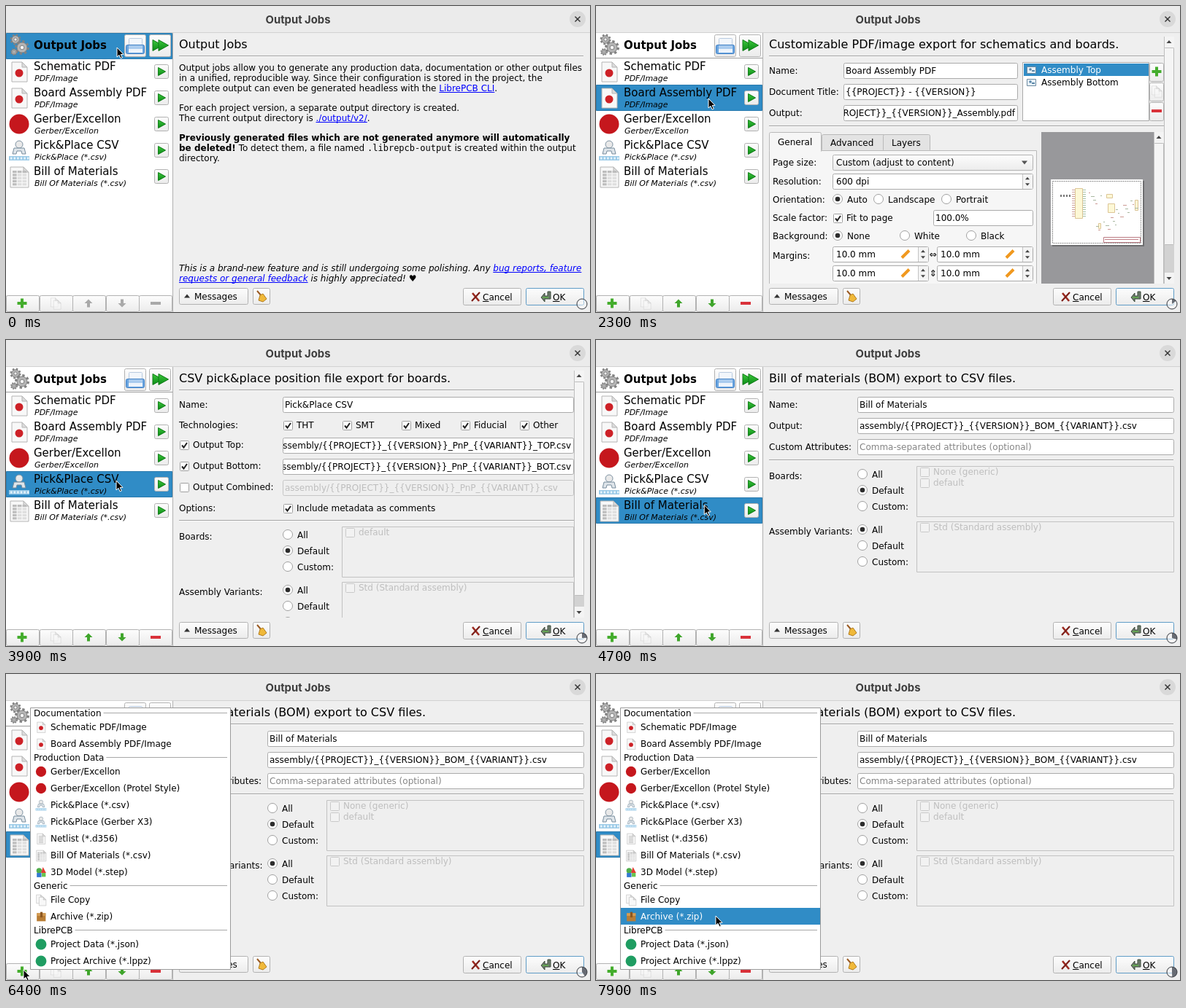
Write an HTML page with a canvas that moves like this. It is 800 by 420 pixels and loops after 8 s.

```html
<!DOCTYPE html>
<html lang="en">
<head>
<meta charset="utf-8">
<title>Output Jobs</title>
<style>
html, body { margin: 0; width: 100%; height: 100%; overflow: hidden; background: #efefef; }
canvas { display: block; width: 800px; height: 420px; }
</style>
</head>
<body>
<canvas id="stage" width="800" height="420"></canvas>
<script>
const c = document.getElementById('stage').getContext('2d');
const LOOP = 8000, STEP = 100, TOTAL = 16000, MENU_AT = 6300;
const BLUE = '#308cc6', GREY = '#bebebe', EDGE = '#ababab', GROOVE = '#d2d2d2';
const SANS = '"DejaVu Sans", sans-serif';
const font = (px, style = '') => `${style} ${px}px ${SANS}`;
const REG = font(12), BOLD = font(12, 'bold'), ITAL = font(12, 'italic');
const MONO = '12px "DejaVu Sans Mono", monospace';

// ---------- basics ----------
function txt(s, x, y, color = '#000', f = REG, align = 'left') {
  c.font = f; c.fillStyle = color; c.textAlign = align;
  c.fillText(s, x, y);
}
function fill(x, y, w, h, color) { c.fillStyle = color; c.fillRect(x, y, w, h); }
function box(x, y, x2, y2, color, edge = EDGE, r = 2) {
  c.beginPath();
  c.roundRect(x + .5, y + .5, x2 - x, y2 - y, r);
  if (color) { c.fillStyle = color; c.fill(); }
  c.strokeStyle = edge; c.lineWidth = 1; c.stroke();
}
function disc(x, y, r, color, edge) {
  c.beginPath(); c.arc(x, y, r, 0, Math.PI * 2);
  c.fillStyle = color; c.fill();
  if (edge) { c.strokeStyle = edge; c.lineWidth = 1; c.stroke(); }
}
function poly(points, color, edge, w = 1) {
  c.beginPath();
  points.forEach(([x, y], i) => i ? c.lineTo(x, y) : c.moveTo(x, y));
  c.closePath();
  if (color) { c.fillStyle = color; c.fill(); }
  if (edge) { c.strokeStyle = edge; c.lineWidth = w; c.stroke(); }
}
function line(x, y, x2, y2, color, w = 1) {
  c.beginPath(); c.moveTo(x, y); c.lineTo(x2, y2);
  c.strokeStyle = color; c.lineWidth = w; c.stroke();
}
function clip(x, y, w, h, draw) {
  c.save(); c.beginPath(); c.rect(x, y, w, h); c.clip(); draw(); c.restore();
}
function at(x, y, k, draw, alpha = 1) {
  c.save(); c.translate(x, y); c.scale(k, k); c.globalAlpha = alpha; draw(); c.restore();
}
// runs: [text, 'b' bold | 'i' italic | 'm' mono, link?]
function rich(x, y, ...runs) {
  for (const [s, kind, link] of runs) {
    txt(s, x, y, link ? '#0000ff' : '#000', { b: BOLD, i: ITAL, m: MONO }[kind] || REG);
    const w = c.measureText(s).width;
    if (link) fill(x, y + 1, w, 1, '#0000ff');
    x += w;
  }
}

// ---------- widgets ----------
function rule(y, x2 = 778) { fill(237, y, x2 - 237, 1, '#a4a4a4'); fill(237, y + 1, x2 - 237, 1, '#fbfbfb'); }
function head(s, x2) { txt(s, 237, 58, '#000', font(16)); if (x2) rule(68, x2); }
function button(x, y, x2, y2, edge = '#b2b2b2') {
  const g = c.createLinearGradient(0, y, 0, y2);
  g.addColorStop(0, '#fdfdfd'); g.addColorStop(1, '#ececec');
  box(x, y, x2, y2, g, edge);
}
function field(x, y, x2, s, { right, off, color } = {}) {
  box(x, y, x2, y + 21, off ? '#efefef' : '#fff', off ? '#c6c6c6' : EDGE);
  clip(x + 1, y, x2 - x - 1, 22, () =>
    txt(s, right ? x2 - 3 : x + 3, y + 15, off ? GREY : color, REG, right ? 'right' : 'left'));
}
function check(x, y, on, s, off) {
  box(x, y, x + 12, y + 12, off ? '#f2f2f2' : '#fff', off ? '#c9c9c9' : '#a0a0a0', 1);
  if (on) {
    c.beginPath(); c.moveTo(x + 3, y + 6.5); c.lineTo(x + 5.5, y + 9.5); c.lineTo(x + 10, y + 3);
    c.strokeStyle = '#222'; c.lineWidth = 2; c.stroke();
  }
  txt(s, x + 18, y + 10, off ? GREY : '#000');
}
function radio(x, y, on, s) {
  disc(x, y, 6.5, '#fff', '#a0a0a0');
  if (on) disc(x, y, 3.3, '#2c2c2c');
  txt(s, x + 13, y + 5);
}
function tri(x, y, dir, color = '#444', s = 3.5) {
  const a = { up: -Math.PI / 2, down: Math.PI / 2, left: Math.PI, right: 0 }[dir];
  c.save(); c.translate(x, y); c.rotate(a);
  poly([[s * .6, 0], [-s * .6, -s], [-s * .6, s]], color);
  c.restore();
}
function vbar(x, y, y2, end) {
  fill(x, y, 14, y2 - y, GROOVE);
  line(x + .5, y, x + .5, y2, '#c2c2c2');
  fill(x + 1, y, 13, 15, '#f4f4f4');
  fill(x + 1, y2 - 15, 13, 15, '#f4f4f4');
  box(x, y + 15, x + 13, end, '#f5f5f5', '#bdbdbd', 1);
  tri(x + 7, y + 7, 'up'); tri(x + 7, y2 - 7, 'down');
}
function spin(x, y, x2, s, ruler) {
  box(x, y, x2, y + 21, '#fff');
  fill(x2 - 14, y + 1, 14, 20, '#f4f4f4');
  line(x2 - 13.5, y + 1, x2 - 13.5, y + 21, '#c4c4c4');
  tri(x2 - 7, y + 6.5, 'up', '#444', 3); tri(x2 - 7, y + 15, 'down', '#444', 3);
  txt(s, x + 5, y + 15);
  if (ruler) line(x2 - 36, y + 15.5, x2 - 26, y + 5.5, '#f0981e', 4);
}

// ---------- icons, drawn around the origin on a 28 px cell ----------
function page(x = -10, y = -13, w = 21, h = 27) {
  poly([[x, y], [x + w - 7, y], [x + w, y + 7], [x + w, y + h], [x, y + h]], '#f8f8f8', '#b4b4b4');
  poly([[x + w - 7, y], [x + w, y + 7], [x + w - 7, y + 7]], '#dcdcdc', '#b4b4b4');
}
function gear(x, y, r) {
  c.beginPath(); c.arc(x, y, r, 0, Math.PI * 2);
  c.setLineDash([r * Math.PI / 8]); c.lineWidth = r * .5; c.strokeStyle = '#828282'; c.stroke();
  c.setLineDash([]);
  disc(x, y, r * .88, '#b5b5b5', '#808080');
  disc(x, y, r * .36, '#f4f4f4', '#808080');
}
const icon = {
  gears() { gear(-5, -8, 6); gear(4, 3, 8); gear(-7, 9, 4); },
  pdf() { page(); disc(0, 2, 5.5, '#cd2127'); },
  gbr() { disc(0, 0, 13.5, '#c5171d'); },
  pnp() {
    disc(0, -8, 5, '#e9e9e9', '#7f93a3');
    poly([[-7, -3], [7, -3], [9, 5], [4, 5], [3, 1], [-3, 1], [-4, 5], [-9, 5]], '#dfe5ea', '#768c9c');
    fill(-14, 8, 28, 6, '#9ccbe8');
    for (let i = 0; i < 6; i++) fill(-12 + i * 4.6, 9.5, 2.4, 3, '#e8f5fc');
  },
  bom() {
    page(-12, -13, 25, 28);
    for (let i = 0; i < 5; i++) for (let j = 0; j < 3; j++)
      fill(-9 + j * 6.8, -8 + i * 4.3, 5.6, 3.2, j && i ? '#dedede' : '#bdbdbd');
  },
  net() { page(); for (let i = 0; i < 5; i++) fill(-6, -7 + i * 4, 12, 2, '#bdbdbd'); },
  cube() {
    disc(-5, -4, 7, '#4fae4c'); fill(-11, 2, 12, 11, '#3278d2');
    poly([[5, -13], [13, 2], [0, 2]], '#e23d33'); fill(2, 2, 10, 10, '#67c54e');
  },
  copy() { page(-12, -13, 18, 22); page(-5, -7, 18, 22); },
  zip() { fill(-11, -9, 23, 21, '#b97d35'); fill(-11, -9, 23, 7, '#d49d55'); fill(-2, -12, 6, 14, '#8c5720'); },
  pcb() { disc(0, 0, 14, '#1f9d62'); },
  tray() {
    box(-9, -11, 9, 0, '#f2f6fb', '#b9cbe0', 1);
    box(-13, -2, 12, 10, '#6aa5e0', '#3f7fc4', 2);
    fill(-9, -1, 19, 5, '#a9cbee');
    fill(-9, 4, 19, 5, '#eef4fb');
  }
};
const put = (name, x, y, k = 1, alpha = 1) => at(x, y, k, icon[name], alpha);
function plus(x, y, s = 6.5) {
  fill(x - s, y - 2, s * 2, 4, '#44ad2d'); fill(x - 2, y - s, 4, s * 2, '#44ad2d');
}
function minus(x, y, color = '#d9323a') { fill(x - 7, y - 2, 14, 4, color); }
function arrow(x, y, d, color) {
  poly([[0, -5.5], [5.5, 0], [2, 0], [2, 5.5], [-2, 5.5], [-2, 0], [-5.5, 0]].map(([a, b]) => [x + a, y + b * d]), color);
}
function play(x, y, s) {
  const g = c.createLinearGradient(0, y - s, 0, y + s);
  g.addColorStop(0, '#3cc83c'); g.addColorStop(1, '#0b8a16');
  poly([[x - s * .8, y - s], [x + s, y], [x - s * .8, y + s]], g, '#0c7a14');
}

// ---------- left side ----------
const jobs = [
  ['Schematic PDF', 'PDF/Image', 'pdf'], ['Board Assembly PDF', 'PDF/Image', 'pdf'],
  ['Gerber/Excellon', 'Gerber/Excellon', 'gbr'], ['Pick&Place CSV', 'Pick&Place (*.csv)', 'pnp'],
  ['Bill of Materials', 'Bill Of Materials (*.csv)', 'bom']
];
function sidebar(sel) {
  fill(0, 37, 229, 360, '#fff');
  fill(0, 71, 228, 1, '#9c9c9c');
  const y0 = sel ? 36 + sel * 36 : 37;
  box(0, y0, 227, y0 + 35, BLUE, '#2a7aae', 0);
  put('gears', 18, 54);
  txt('Output Jobs', 38, 59, '#000', font(15, 'bold'));
  button(162, 39, 191, 69);
  put('tray', 177, 55);
  button(196, 39, 225, 69);
  play(207, 54, 7.5); play(215, 54, 7.5);
  jobs.forEach(([name, kind, ic], i) => {
    const y = 90 + i * 36;
    put(ic, 18, y);
    txt(name, 38, y - 2, '#000', font(15));
    txt(kind, 39, y + 13, '#000', font(11, 'italic'));
    button(203, y - 10, 222, y + 9);
    play(213, y, 5.5);
  });
  fill(228, 37, 1, 383, '#b0b0b0');
  for (let i = 0; i < 5; i++) button(Math.round(i * 45.6), 397, Math.round(i * 45.6) + 45, 419);
  plus(22, 408); put('copy', 68, 408, .55, .5);
  arrow(113, 408, 1, sel ? '#3fa52b' : '#a9a9a9');
  arrow(159, 408, -1, sel ? '#3fa52b' : '#a9a9a9');
  minus(205, 408, sel ? undefined : '#a9a9a9');
}

// ---------- pages ----------
function overview() {
  head('Output Jobs', 791);
  rich(237, 89, ['Output jobs allow you to generate any production data, documentation or other output files']);
  rich(237, 103, ['in a unified, reproducible way. Since their configuration is stored in the project, the']);
  rich(237, 117, ['complete output can even be generated headless with the '], ['LibrePCB CLI', '', 1], ['.']);
  rich(237, 144, ['For each project version, a separate output directory is created.']);
  rich(237, 158, ['The current output directory is '], ['./output/v2/', '', 1], ['.']);
  rich(237, 185, ['Previously generated files which are not generated anymore will automatically', 'b']);
  rich(237, 199, ['be deleted!', 'b'], [' To detect them, a file named '], ['.librepcb-output', 'm'], [' is created within the output']);
  rich(237, 213, ['directory.']);
  rich(237, 364, ['This is a brand-new feature and is still undergoing some polishing. Any ', 'i'], ['bug reports, feature', 'i', 1]);
  rich(237, 378, ['requests or general feedback', 'i', 1], [' is highly appreciated! ♥', 'i']);
}

function sheet() {
  fill(610, 173, 154, 210, '#98989b');
  fill(625, 240, 126, 90, '#6e6e70');
  fill(623, 238, 126, 90, '#fff');
  c.setLineDash([2, 1]);
  box(625, 240, 746, 325, null, '#8a8a8a', 0);
  c.setLineDash([]);
  box(656, 250, 666, 291, '#fdf8d6', '#dcc596', 0);
  for (let i = 0; i < 13; i++) { fill(652, 252 + i * 3, 4, 1, '#d0a39d'); fill(667, 252 + i * 3, 4, 1, '#a5c2a5'); }
  for (const [x, y, w, h] of [[699, 258, 8, 5], [701, 271, 9, 12], [738, 266, 4, 14], [688, 298, 3, 7]])
    box(x, y, x + w, y + h, '#fdf8d6', '#dcc596', 0);
  for (let i = 0; i < 22; i++)
    fill(675 + i * 37 % 64, 256 + i * 23 % 52, 2 + i % 4, 1, i % 3 ? '#a9b8a1' : '#cc9a94');
  for (let i = 0; i < 4; i++) fill(636 + i * 4, 259, 2, 3, '#777');
  box(695, 317, 745, 324, '#fff', '#bb7b83', 0);
  fill(697, 320, 46, 1, '#c08089');
}

function graphics(name, file, layers) {
  head('Customizable PDF/image export for schematics and boards.', 778);
  txt('Name:', 237, 93); field(339, 78, 577, name);
  txt('Document Title:', 237, 122); field(339, 107, 577, '{{PROJECT}} - {{VERSION}}');
  txt('Output:', 237, 151); field(339, 136, 577, `{{PROJECT}}_{{VERSION}}_${file}.pdf`, { right: true });
  box(584, 77, 757, 157, '#fff', EDGE, 0);
  fill(586, 79, 171, 17, BLUE);
  layers.forEach((s, i) => {
    const y = 88 + i * 17;
    box(590, y - 5, 602, y + 4, '#e8f2fa', '#6d8aa0', 0);
    disc(595, y - 1, 1.8, '#5b87a8'); fill(597, y, 4, 2, '#5b87a8');
    txt(s, 610, y + 4, i ? '#000' : '#fff');
  });
  for (const y of [78, 105, 132]) button(758, y, 777, y + 25);
  plus(768, 90); put('copy', 768, 117, .55, .5); minus(768, 144);
  rule(164);

  box(309, 176, 396, 199, '#e3e3e3', '#b9b9b9');
  box(393, 176, 457, 199, '#e3e3e3', '#b9b9b9');
  box(237, 198, 603, 400, '#f6f6f6', '#b9b9b9', 0);
  box(237, 173, 308, 200, '#f6f6f6', '#b9b9b9');
  fill(238, 197, 70, 5, '#f6f6f6');
  txt('General', 249, 191); txt('Advanced', 321, 192); txt('Layers', 405, 192);
  txt('Page size:', 242, 219);
  ['Resolution:', 'Orientation:', 'Scale factor:', 'Background:'].forEach((s, i) => txt(s, 242, 245 + i * 25));
  txt('Margins:', 242, 347);
  button(324, 204, 598, 225);
  txt('Custom (adjust to content)', 329, 219); tri(587, 215, 'down', '#555', 4);
  spin(324, 230, 598, '600 dpi');
  radio(331, 265, 1, 'Auto'); radio(387, 265, 0, 'Landscape'); radio(480, 265, 0, 'Portrait');
  check(325, 285, 1, 'Fit to page'); field(462, 280, 598, '100.0%');
  radio(331, 315, 1, 'None'); radio(423, 315, 0, 'White'); radio(514, 315, 0, 'Black');
  [330, 356].forEach((y, i) => {
    spin(324, y, 455, '10.0 mm', 1); spin(467, y, 598, '10.0 mm', 1);
    txt(i ? '⇕' : '⇔', 461.5, y + 15, '#000', REG, 'center');
  });
  sheet();
  vbar(764, 173, 420, 405);
  fill(778, 37, 20, 346, '#efefef');
  vbar(778, 42, 381, 327);
}

function gerber() {
  clip(230, 37, 548, 329, () => {
    head('Gerber (RS-274X) / Excellon (XNC) PCB production data export for boards.');
    rich(237, 80, ["Note that it's highly recommended to review the generated files before ordering", 'b']);
    rich(237, 94, ['This could be done with the free application '], ['gerbv', '', 1], [' or the '], ['official reference viewer from Uc', '', 1]);
    rich(237, 121, ['As a simpler and faster alternative, you could use the '], ['Order PCB', '', 1], [' feature instead.']);
    rule(130);
    txt('Name:', 237, 155); field(367, 140, 840, 'Gerber/Excellon');
    txt('Base Path:', 237, 184); field(367, 169, 840, 'gerber/{{PROJECT}}_{{VERSION}}');
    [
      ['Outlines:', '_OUTLINES.gbr', 'Inner Copper:', 'ER-IN{{CU_LAYER}}.gbr', -4],
      ['Top Copper:', '_COPPER-TOP.gbr', 'Bottom Copper:', '_COPPER-BOTTOM.gbr', 0],
      ['Top Stopmask:', '_SOLDERMASK-TOP.gbr', 'Bottom Stopmask:', 'OLDERMASK-BOTTOM.gbr', -12],
      ['Top Silkscreen:', '_SILKSCREEN-TOP.gbr', 'Bottom Silkscreen:', 'ILKSCREEN-BOTTOM.gbr', -3],
      ['Drills NPTH:', '_DRILLS-NPTH.drl', 'Drills PTH:', '_DRILLS-PTH.drl', 0]
    ].forEach(([a, b, d, e, dx], i) => {
      const y = 198 + i * 29;
      txt(a, 237, y + 15); field(367, y, 518, b);
      txt(d, 525, y + 15); field(679, y, 840, '');
      clip(680, y, 98, 22, () => txt(e, 682 + dx, y + 15));
    });
    check(238, 347, 0, 'Merge PTH and NPTH drills into one file:');
    field(679, 343, 840, '_DRILLS.drl', { off: true });
  });
  vbar(778, 42, 366, 248);
  fill(237, 367, 541, 14, GROOVE);
  fill(237, 367, 14, 14, '#f4f4f4'); fill(764, 367, 14, 14, '#f4f4f4');
  box(251, 367, 632, 380, '#f5f5f5', '#bdbdbd', 1);
  tri(243, 374, 'left'); tri(771, 374, 'right');
}

function choices(x, y, on, boxX, boxX2, items) {
  ['All', 'Default', 'Custom:'].forEach((s, i) => radio(x, y + i * 22, i === on, s));
  box(boxX, y - 11, boxX2, y + 58, '#efefef', '#c2c2c2', 0);
  items.forEach((s, i) => check(boxX + 5, y - 9 + i * 15, 0, s, true));
}

function pickPlace() {
  head('CSV pick&place position file export for boards.', 778);
  txt('Name:', 237, 93); field(379, 78, 777, 'Pick&Place CSV');
  txt('Technologies:', 237, 121);
  ['THT', 'SMT', 'Mixed', 'Fiducial', 'Other'].forEach((s, i) => check(380 + i * 81, 111, 1, s));
  const path = 'assembly/{{PROJECT}}_{{VERSION}}_PnP_{{VARIANT}}';
  check(238, 138, 1, 'Output Top:'); field(379, 134, 777, path + '_TOP.csv', { right: true });
  check(238, 167, 1, 'Output Bottom:'); field(379, 163, 777, path + '_BOT.csv', { right: true });
  check(238, 196, 0, 'Output Combined:'); field(379, 192, 777, path + '.csv', { off: true });
  txt('Options:', 237, 235); check(380, 225, 1, 'Include metadata as comments');
  rule(247);
  txt('Boards:', 237, 274); choices(386, 267, 1, 460, 777, ['default']);
  txt('Assembly Variants:', 237, 350); choices(386, 343, 0, 460, 777, ['Std (Standard assembly)']);
  vbar(778, 42, 381, 350);
}

function materials() {
  head('Bill of materials (BOM) export to CSV files.', 791);
  txt('Name:', 237, 93); field(358, 78, 791, 'Bill of Materials');
  txt('Output:', 237, 122); field(358, 107, 791, 'assembly/{{PROJECT}}_{{VERSION}}_BOM_{{VARIANT}}.csv');
  txt('Custom Attributes:', 237, 151);
  field(358, 136, 791, 'Comma-separated attributes (optional)', { color: '#858585' });
  rule(164, 791);
  txt('Boards:', 237, 191); choices(365, 184, 1, 439, 791, ['None (generic)', 'default']);
  txt('Assembly Variants:', 237, 267); choices(365, 260, 0, 439, 791, ['Std (Standard assembly)']);
}

const pages = [
  overview,
  () => graphics('Schematic PDF', 'Schematic', ['Schematic']),
  () => graphics('Board Assembly PDF', 'Assembly', ['Assembly Top', 'Assembly Bottom']),
  gerber, pickPlace, materials
];
const starts = [0, 900, 1900, 2800, 3700, 4600];

// ---------- frame around the pages ----------
function titleBar() {
  fill(0, 0, 800, 37, '#ebebeb');
  fill(0, 36, 800, 1, '#d2d2d2');
  txt('Output Jobs', 400, 24, '#3d3d3d', '700 14.8px Inter, sans-serif', 'center');
  disc(783, 18, 11, '#d9d9d9');
  line(779.5, 14.5, 786.5, 21.5, '#333', 1.4); line(786.5, 14.5, 779.5, 21.5, '#333', 1.4);
}
function mnemonic(s, x, y) {
  txt(s, x, y);
  fill(x, y + 1, c.measureText(s[0]).width, 1, '#000');
}
function footer() {
  button(237, 387, 331, 409); tri(248, 398, 'up', '#333', 4); txt('Messages', 258, 403);
  button(338, 387, 361, 409);
  line(344, 391, 350, 398, '#9a5a22', 2);
  poly([[348, 397], [352, 395], [357, 402], [352, 406], [346, 404]], '#f0b93a', '#b47d1d');
  button(626, 387, 705, 410);
  line(639, 394, 648, 405, '#9c2a20', 2.6); line(649, 393, 638, 405, '#7c1e18', 2.2);
  mnemonic('Cancel', 653, 404);
  button(712, 387, 791, 410, '#5f9cc6');
  poly([[733, 400], [738, 394], [738, 398], [742, 398], [742, 392], [746, 392], [746, 402], [738, 402], [738, 406]], '#6b7b6b', '#3d4a3d');
  line(735, 400, 743, 400, '#63b14d', 1.6);
  mnemonic('OK', 749, 404);
}

// [label, centre y, icon]; no icon means a section heading
const menu = [
  ['Documentation', 54], ['Schematic PDF/Image', 73, 'pdf'], ['Board Assembly PDF/Image', 96, 'pdf'],
  ['Production Data', 115], ['Gerber/Excellon', 134, 'gbr'], ['Gerber/Excellon (Protel Style)', 157, 'gbr'],
  ['Pick&Place (*.csv)', 180, 'pnp'], ['Pick&Place (Gerber X3)', 203, 'pnp'], ['Netlist (*.d356)', 226, 'net'],
  ['Bill Of Materials (*.csv)', 249, 'bom'], ['3D Model (*.step)', 272, 'cube'],
  ['Generic', 291], ['File Copy', 310, 'copy'], ['Archive (*.zip)', 333, 'zip'],
  ['LibrePCB', 352], ['Project Data (*.json)', 371, 'pcb'], ['Project Archive (*.lppz)', 394, 'pcb']
];
function popup(mx, my) {
  box(33, 46, 307, 405, '#fff', '#9a9a9a', 0);
  for (const [s, y, ic] of menu) {
    if (!ic) {
      txt(s, 38, y + 4);
      const x = 41 + c.measureText(s).width;
      fill(x, y - 1, 303 - x, 1, '#a8a8a8');
      continue;
    }
    const hot = mx > 33 && Math.abs(my - y) < 11.5;
    if (hot) fill(34, y - 12, 273, 23, BLUE);
    put(ic, 48, y, .53);
    txt(s, 61, y + 4, hot ? '#fff' : '#000');
  }
}

// ---------- pointer ----------
const path = [
  [0, 152, 57], [400, 152, 57], [900, 155, 78], [1400, 156, 90], [1900, 155, 112], [2300, 154, 127],
  [2800, 153, 152], [3100, 153, 163], [3500, 152, 172], [3900, 151, 193], [4200, 151, 205],
  [4600, 150, 222], [5000, 143, 240], [5400, 105, 298], [6000, 28, 402], [6200, 24, 406],
  [6500, 24, 406], [6900, 55, 398], [7900, 164, 332]
];
function pointerAt(t) {
  const i = Math.max(1, path.findIndex(p => p[0] >= t));
  const [t0, x0, y0] = path[i - 1], [t1, x1, y1] = path[i];
  const k = (t - t0) / (t1 - t0);
  return [x0 + (x1 - x0) * k, y0 + (y1 - y0) * k];
}
function pointer(x, y) {
  const shape = [[0, 0], [0, 13], [3, 10.3], [5.2, 15], [7.3, 14], [5.2, 9.5], [9, 9.3]];
  poly(shape.map(([a, b]) => [x + a, y + b]), '#000', '#fff', 1);
}
function progress(t) {
  disc(789, 409, 7, 'rgba(255,255,255,.45)');
  c.beginPath(); c.moveTo(789, 409);
  c.arc(789, 409, 7, -Math.PI / 2, -Math.PI / 2 + t / TOTAL * Math.PI * 2);
  c.fillStyle = '#686c74'; c.fill();
  c.beginPath(); c.arc(789, 409, 7, 0, Math.PI * 2);
  c.strokeStyle = '#33363c'; c.lineWidth = 1; c.stroke();
}

function draw(t) {
  const sel = starts.filter(s => s <= t).length - 1;
  const [mx, my] = pointerAt(t);
  fill(0, 0, 800, 420, '#efefef');
  titleBar();
  sidebar(sel);
  clip(230, 37, 570, sel ? 344 : 348, pages[sel]);
  footer();
  if (t >= MENU_AT) popup(mx, my);
  pointer(mx, my);
  progress(t);
}

let start;
function tick(now) {
  start ??= now;
  draw(Math.floor((now - start) % LOOP / STEP) * STEP);
  requestAnimationFrame(tick);
}
draw(0);
requestAnimationFrame(tick);
</script>
</body>
</html>
```
